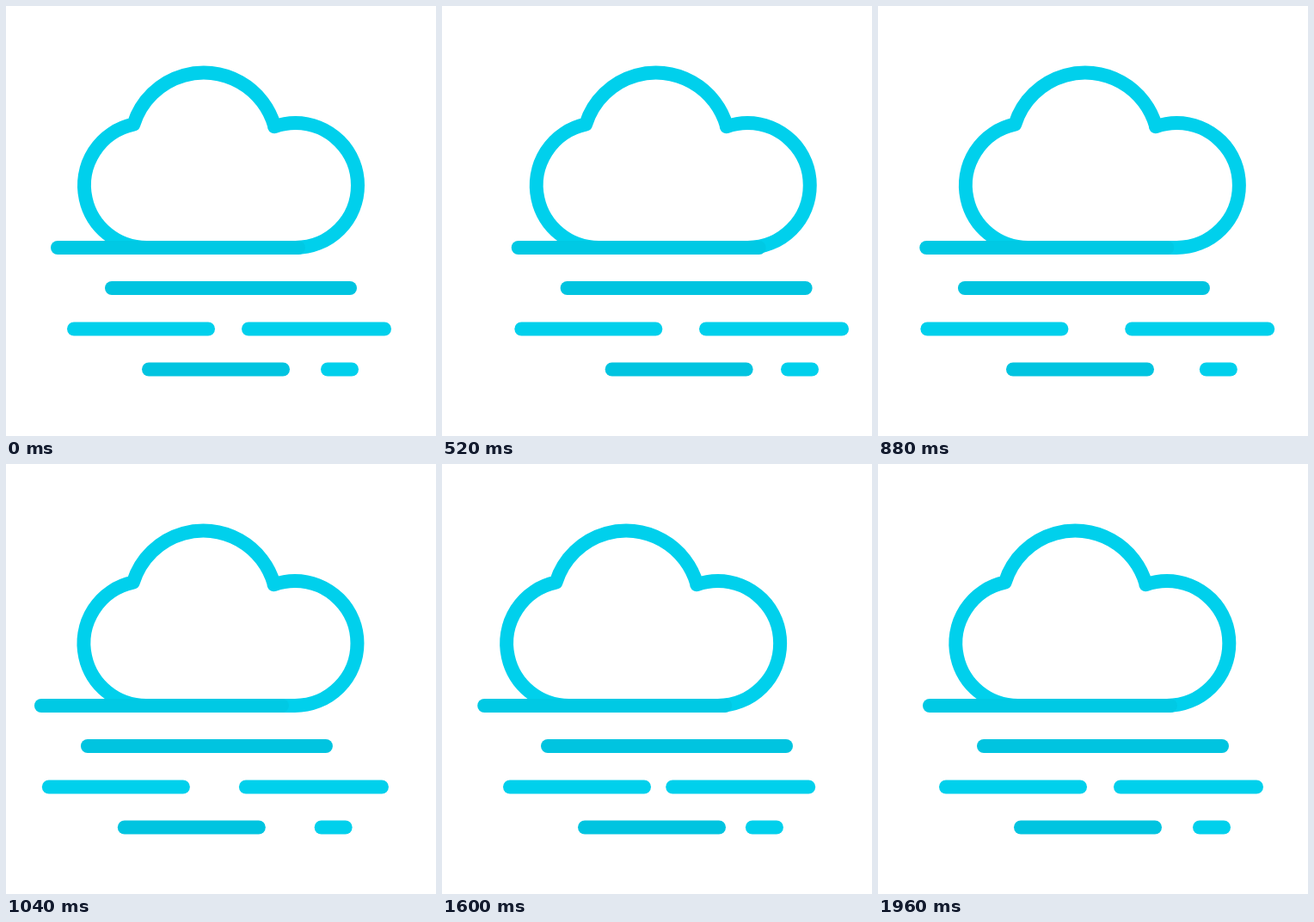
Write an HTML page with a canvas that moves like this. It is 500 px wide and 500 px high and loops after 2 s.

```html
<!DOCTYPE html>
<html lang="en">
<head>
<meta charset="utf-8">
<title>Drifting cloud and mist</title>
<style>
  html, body { margin: 0; width: 100%; height: 100%; overflow: hidden; background: #fff; }
  canvas { display: block; width: 500px; height: 500px; }
</style>
</head>
<body>
<canvas id="stage" width="500" height="500"></canvas>
<script>
const ctx = document.getElementById('stage').getContext('2d');
const LOOP = 2000, STEP = 40;
const LIGHT = '#00d0ec', MID = '#00c9e4', DARK = '#00c4e0';

// Each sway goes 0 -> right (at) -> left (at) -> 0 (at), times in ms.
const cloud = { sway: [22.5, 660, 22.5, 1405, 2000] };
const bars = [
  { x1: 60,  x2: 340, y: 281,   color: MID,   sway: [30, 480, 30, 1205, 1845] },
  { x1: 123, x2: 400, y: 328,   color: DARK,  sway: [30, 425, 30, 980, 1530] },
  { x1: 79,  x2: 235, y: 375.5, color: LIGHT, sway: [30, 295, 30, 1015, 1405] },
  { x1: 282, x2: 440, y: 375.5, color: LIGHT, sway: [30, 660, 30, 1360, 1810] },
  { x1: 166, x2: 322, y: 422.5, color: DARK,  sway: [32, 540, 30, 1075, 1570] },
  { x1: 374, x2: 402, y: 422.5, color: LIGHT, sway: [30, 585, 30, 1340, 1810] }
];

// Soft ease, the same as cubic-bezier(1/6, 0, 5/6, 1).
function ease(p) {
  if (p <= 0) return 0;
  if (p >= 1) return 1;
  let lo = 0, hi = 1;
  for (let i = 0; i < 24; i++) {
    const s = (lo + hi) / 2, r = 1 - s;
    const x = r * r * s / 2 + 2.5 * r * s * s + s * s * s;
    if (x < p) lo = s; else hi = s;
  }
  return lo * lo * (3 - 2 * lo);
}

function offset([right, t1, left, t2, t3], t) {
  const go = (a, b, from, to) => from + (to - from) * ease((t - a) / (b - a));
  if (t < t1) return go(0, t1, 0, right);
  if (t < t2) return go(t1, t2, right, -left);
  return go(t2, t3, -left, 0);
}

function arcBetween(cx, cy, r, x1, y1, x2, y2) {
  ctx.arc(cx, cy, r, Math.atan2(y1 - cy, x1 - cx), Math.atan2(y2 - cy, x2 - cx), true);
}

function drawCloud(dx) {
  ctx.save();
  ctx.translate(dx, 0);
  ctx.strokeStyle = LIGHT;
  ctx.beginPath();
  arcBetween(336.5, 208.5, 72.5, 336.5, 281, 312, 140);
  arcBetween(230, 163, 85.5, 312, 140, 148, 137.5);
  arcBetween(163.5, 208.5, 72.5, 148, 137.5, 163.5, 281);
  ctx.closePath();
  ctx.stroke();
  ctx.restore();
}

function drawBar({ x1, x2, y, color, sway }, t) {
  const dx = offset(sway, t);
  ctx.strokeStyle = color;
  ctx.beginPath();
  ctx.moveTo(x1 + dx, y);
  ctx.lineTo(x2 + dx, y);
  ctx.stroke();
}

function draw(t) {
  ctx.fillStyle = '#fff';
  ctx.fillRect(0, 0, 500, 500);
  ctx.lineWidth = 16;
  ctx.lineCap = ctx.lineJoin = 'round';
  drawCloud(offset(cloud.sway, t));
  bars.forEach(bar => drawBar(bar, t));
}

const start = performance.now();
function tick() {
  const t = (performance.now() - start) % LOOP;
  draw(Math.floor(t / STEP) * STEP);
  requestAnimationFrame(tick);
}
tick();
</script>
</body>
</html>
```
